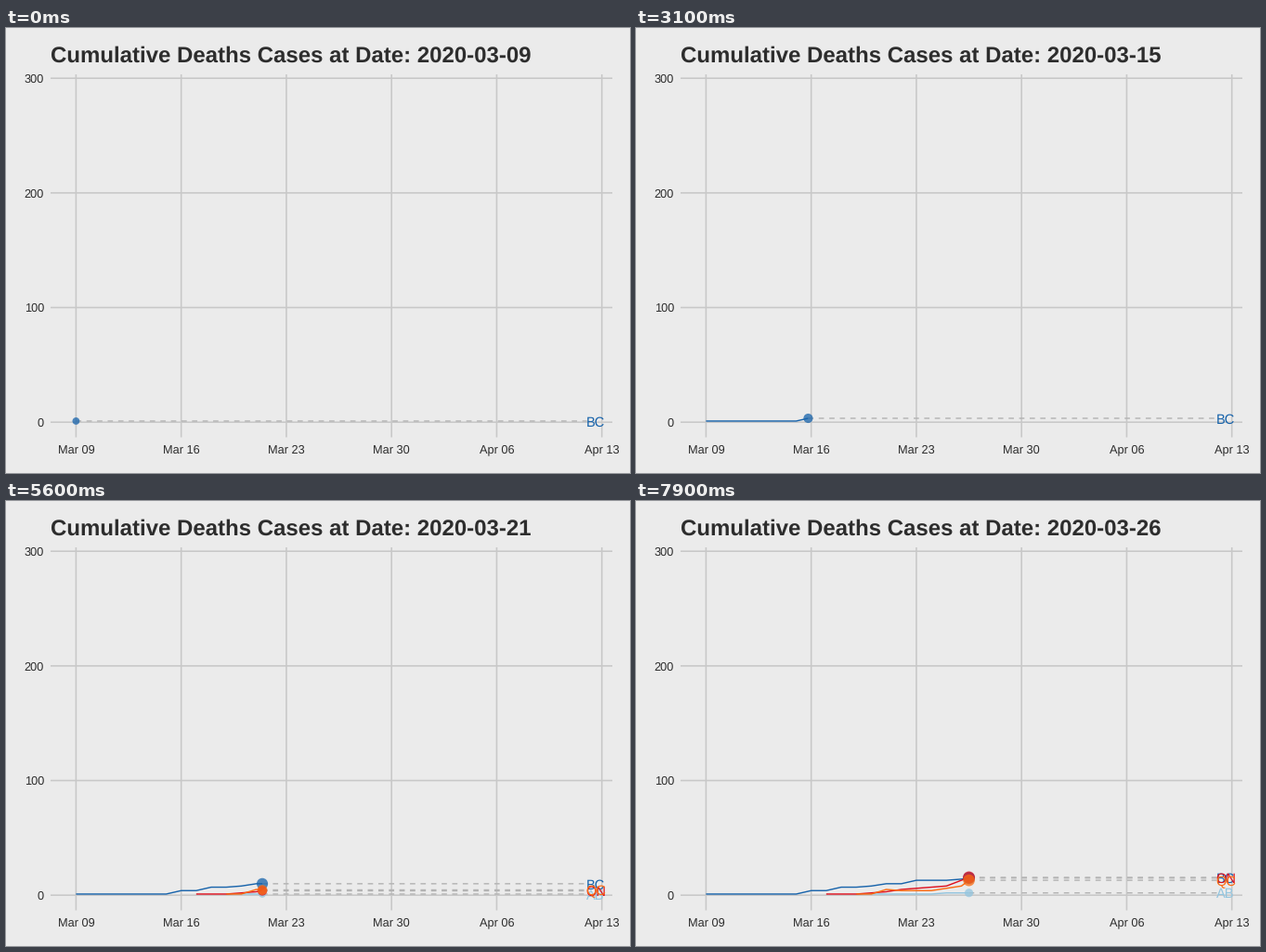
Write a matplotlib script that moves like this. It is 672x480 px and loops after 8 s.

```python
import numpy as np
import matplotlib.pyplot as plt
from matplotlib.animation import FuncAnimation
from matplotlib.patches import Circle

W, H, DPI = 672, 480, 96
BG, GRID, INK, DASH = "#ebebeb", "#c8c8c8", "#2d2d2d", "#b3b3b3"
PX = 72 / DPI                      # points per pixel
X0, DAY = 75.4, 16.18              # first date, pixels per day
Y0, UNIT = 425.2, 1.2367           # zero level, pixels per death
LABEL_X = X0 + 34 * DAY

plt.rcParams.update({
    "font.family": "Liberation Sans",
    "text.hinting": "none",
    "path.snap": False,
    "lines.dash_capstyle": "butt",
    "lines.solid_capstyle": "butt",
})

fig = plt.figure(figsize=(W / DPI, H / DPI), dpi=DPI, facecolor=BG)
ax = fig.add_axes([0, 0, 1, 1])
ax.set(xlim=(0, W), ylim=(H, 0))
ax.axis("off")


def px(day):
    return X0 + DAY * np.asarray(day)


def py(count):
    return Y0 - UNIT * np.asarray(count)


def text(x, y, s, size, color=INK, **kw):
    return ax.text(x, y, s, fontsize=size, color=color, va="baseline", **kw)


def line(color, width, z, **kw):
    return ax.plot([], [], color=color, lw=width * PX, zorder=z, **kw)[0]


# Static grid and axis labels
for count in (0, 100, 200, 300):
    line(GRID, 1.6, 1).set_data([48, 653], [py(count)] * 2)
    text(41, py(count) + 4.6, str(count), 9.6, ha="right")
for k, name in enumerate(["Mar 09", "Mar 16", "Mar 23", "Mar 30", "Apr 06", "Apr 13"]):
    line(GRID, 1.6, 1).set_data([px(7 * k)] * 2, [50, 441.5])
    text(px(7 * k), 458.5, name, 9.6, ha="center")
title = text(47.8, 37.2, "", 18, weight="bold")


class Region:
    """Cumulative curve with a leading dot, dashed guide and end label."""

    def __init__(self, name, color, start, counts, z):
        self.start = start
        self.days = start + np.arange(len(counts))
        self.counts = counts
        self.curve = line(color, 1.42, 2 + z)
        self.guide = line(DASH, 1.42, 3 + z, ls=(0, (4, 4)))
        self.dot = Circle((0, 0), 4, fc=color, ec="none", alpha=0.75, zorder=4 + z)
        ax.add_patch(self.dot)
        self.label = text(LABEL_X - 0.8, 0, name, 11, color, zorder=5 + z)
        self.parts = [self.curve, self.guide, self.dot, self.label]

    def update(self, day):
        shown = day >= self.start
        for part in self.parts:
            part.set_visible(shown)
        if not shown:
            return
        now = np.interp(day, self.days, self.counts)
        past = self.days <= day
        self.curve.set_data(px(np.append(self.days[past], day)),
                            py(np.append(np.array(self.counts)[past], now)))
        x, y = float(px(day)), float(py(now))
        self.guide.set_data([x, LABEL_X], [y, y])
        self.dot.center = x, y
        self.dot.radius = 3.9 + 0.95 * np.log(now)
        self.label.set_y(y + 5.7)


regions = [
    Region("AB", "#93c5df", 10, [1, 1, 1, 1, 1, 1, 2, 2, 2], 0.0),
    Region("BC", "#1763ab", 0,
           [1, 1, 1, 1, 1, 1, 1, 4, 4, 7, 7, 8, 10, 10, 13, 13, 13, 14, 16], 0.1),
    Region("ON", "#dd0f1e", 8, [1, 1, 1, 2, 3, 5, 6, 7, 8, 13, 18], 0.2),
    Region("QC", "#fb6a10", 10, [1, 1, 5, 4, 4, 4, 6, 8, 18], 0.3),
]


def day_at(i):
    """Two days take nine steps: five for the first, four for the second."""
    pair, step = divmod(i, 9)
    return 2 * pair + (step / 5 if step < 5 else 1 + (step - 5) / 4)


def draw(i):
    day = day_at(i)
    title.set_text(f"Cumulative Deaths Cases at Date: 2020-03-{9 + int(day):02d}")
    for region in regions:
        region.update(day)
    return []


anim = FuncAnimation(fig, draw, frames=80, interval=100, repeat=True, repeat_delay=0)
plt.show()
```
